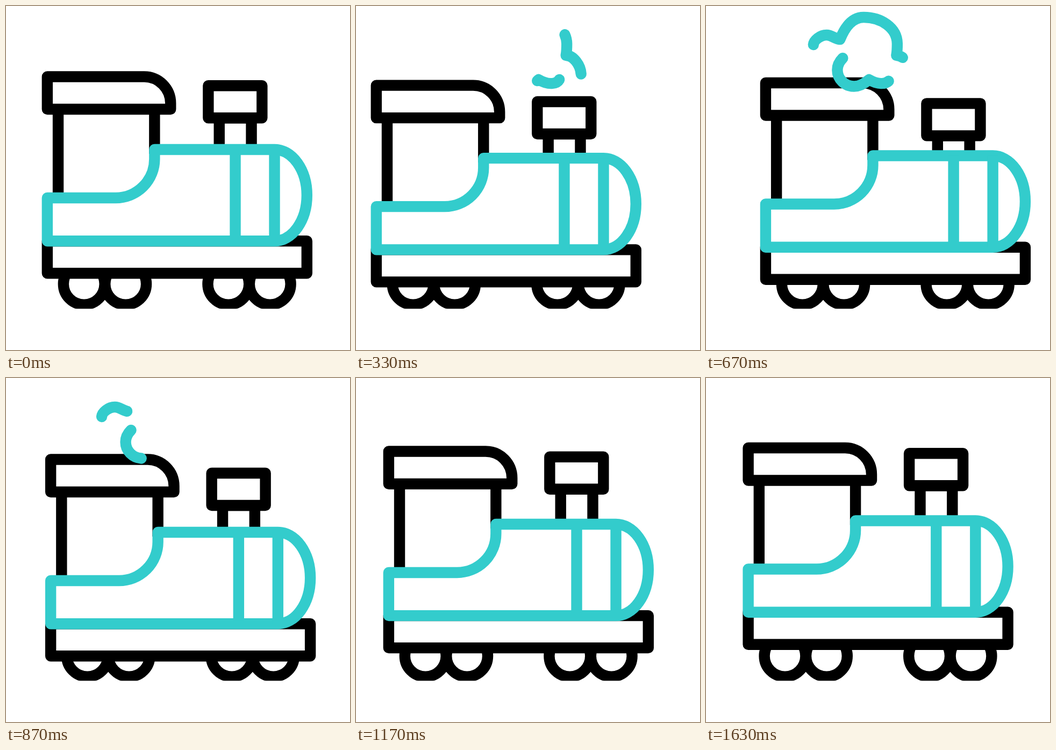
An HTML page that plays this animation: 640 px wide and 640 px high, repeating every 1.67 s.

```html
<!DOCTYPE html>
<html lang="en">
<head>
<meta charset="utf-8">
<title>Steam train</title>
<style>
  html, body { margin: 0; width: 100%; height: 100%; overflow: hidden; background: #fff; }
  svg { display: block; width: 100%; height: 100%; }
  .line { fill: #fff; stroke: #000; stroke-width: 20.4; stroke-linejoin: round; }
  .teal { stroke: #3cc; }
  .open { fill: none; }
  .smoke { stroke-linecap: round; }
</style>
</head>
<body>
<svg viewBox="0 0 640 640">
  <clipPath id="ground"><rect width="640" height="563.3"/></clipPath>
  <g clip-path="url(#ground)">
    <g id="wheels" class="line open">
      <circle cx="145.2" cy="517.2" r="38.4"/>
      <circle cx="222.6" cy="517.2" r="38.4"/>
      <circle cx="413.8" cy="517.2" r="38.4"/>
      <circle cx="491.2" cy="517.2" r="38.4"/>
    </g>
  </g>
  <g id="train" class="line">
    <path class="open" d="M97 192V357M276.3 192V275"/>
    <path d="M257 131.5H76.8V192H306.2V181A49.2 49.5 0 0 0 257 131.5Z"/>
    <g id="chimney">
      <path d="M396.7 300V208.3H456.5V300"/>
      <path d="M376.3 148.3H476.3V208.3H376.3Z"/>
    </g>
    <path d="M76.8 437.2H559.8V497.2H76.8Z"/>
    <g class="teal">
      <path d="M76.8 357H204A72.3 72.3 0 0 0 276.3 284.7V267H499.5A60.3 85.1 0 0 1 499.5 437.2H76.8Z"/>
      <path d="M426.5 267V437M499.5 267V437"/>
    </g>
  </g>
  <g id="smoke" class="line open teal smoke">
    <path id="upper" pathLength="1" d="M382 126.5C381 110 368 92 354 92Q355.5 84 355.5 70C355 40 325 21 293 21C270 21 257 42 249 62C240 62 234 54 224 54C212 54 200 64 199.5 72"/>
    <path id="lower" pathLength="1" d="M341.5 137C337 145 322 148 303 137C296 143 287 149.5 275 149.5C258 149.5 244 136 244 119C244 110 249 102 254 97"/>
  </g>
</svg>
<script>
const LOOP = 1670, FRAMES = 50, STEP = 100 / 3;
const el = id => document.getElementById(id);

// Keys are [time, value]; the value eases in and out between them.
const driveX = [[-40, 68.3], [290, 25], [692, 101.5], [1038, 45], [1444, 68.3]];
const bounceY = [[-40, 255], [228, 280], [522, 255], [803, 280], [1073, 255], [1355, 280], [1630, 255]];
const squash = [[-40, -6.5], [65, 13.5], [330, 13.5], [660, 21.5], [1100, -6.5]];
const drawn = [[185, 0], [585, 1]];
const upperErased = [[575, 0], [985, 1]];
const lowerErased = [[622, 0], [1102, 1]];

function ease(keys, t) {
  if (t <= keys[0][0]) return keys[0][1];
  for (let i = 1; i < keys.length; i++) {
    const [t0, a] = keys[i - 1], [t1, b] = keys[i];
    if (t < t1) {
      const u = (t - t0) / (t1 - t0);
      return a + (b - a) * u * u * (3 - 2 * u);
    }
  }
  return keys[keys.length - 1][1];
}

function move(id, x, y) {
  el(id).setAttribute("transform", `translate(${x} ${y})`);
}

function trim(id, start, end) {
  const path = el(id);
  path.style.display = end > start ? "" : "none";
  path.setAttribute("stroke-dasharray", `${Math.max(0, end - start)} 2`);
  path.setAttribute("stroke-dashoffset", -start);
}

function render(t) {
  const x = ease(driveX, t) - 66.5;
  move("train", x, ease(bounceY, t) - 256.5);
  move("wheels", x, 0);
  move("chimney", 0, ease(squash, t));
  move("smoke", (670 - t) * 0.109, 0);
  trim("upper", ease(upperErased, t), ease(drawn, t));
  trim("lower", ease(lowerErased, t), ease(drawn, t));
}

const begin = performance.now();
function tick() {
  const t = (performance.now() - begin) % LOOP;
  render(Math.min(FRAMES - 1, Math.floor((t + 3.4) / STEP)) * STEP);
  requestAnimationFrame(tick);
}
tick();
</script>
</body>
</html>
```
